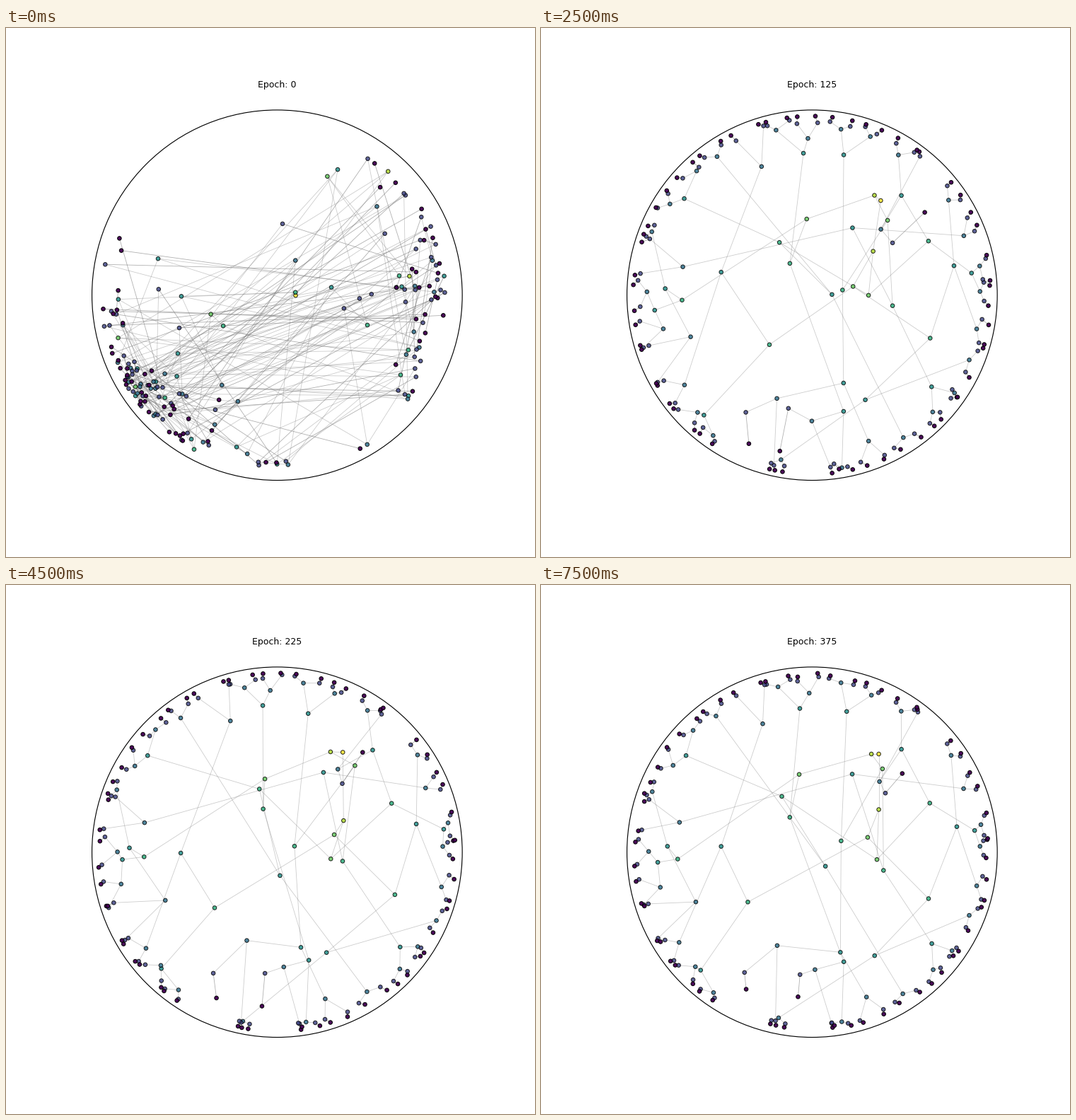
Recreate the animation shown at these times as a matplotlib script. Size 748x748 px, loop 8 s.

```python
import numpy as np
import matplotlib.pyplot as plt
from matplotlib.animation import FuncAnimation
from matplotlib.collections import LineCollection

FRAMES, STEP, INTERVAL = 16, 25, 500
RIM = 0.967
PINNED, INNER, HUB_END, BRANCH, TOTAL = 7, 31, 63, 127, 191
rng = np.random.default_rng(4)

# Perfect binary tree in heap order; every twig at the end carries one leaf.
ids = np.arange(TOTAL)
parent = np.where(ids < BRANCH, (ids - 1) // 2, ids - 64)
parent[0] = 0
height = np.where(ids < BRANCH, 7 - np.floor(np.log2(ids + 1)), 0)

# Where the top three levels settle, in disk coordinates.
CROWN = np.array([0.36 + 0.53j, 0.32 + 0.53j, 0.36 + 0.23j, -0.07 + 0.42j,
                  0.38 + 0.45j, 0.30 + 0.08j, 0.35 - 0.04j])


def polar(r, degrees):
    return r * np.exp(1j * np.radians(degrees))


def clip_disk(z, limit):
    return z * np.minimum(1, limit / np.maximum(np.abs(z), 1e-9))


def hub_angles():
    """Evenly spread hubs; half the sibling pairs are neighbours."""
    slots = np.arange(32).reshape(16, 2)
    slots[1::2] = rng.permutation(slots[1::2].ravel()).reshape(8, 2)
    rng.shuffle(slots)
    return slots.ravel() * 11.25 + rng.uniform(-2, 2, 32)


def settled_pose():
    z = np.zeros(BRANCH, complex)
    z[:PINNED] = CROWN
    angle = hub_angles()
    r = 0.93 - rng.exponential(0.05, 32)
    deep = np.arange(32) % 10 == 4
    r[deep] = rng.uniform(0.5, 0.65, deep.sum())
    z[INNER:HUB_END] = polar(r, angle)

    for _ in range(60):
        for i in range(PINNED, INNER):
            kids = z[2 * i + 1] + z[2 * i + 2]
            z[i] = 0.15 * z[parent[i]] + 0.425 * kids
    free = slice(PINNED, INNER)
    noise = rng.normal(size=(2, INNER - PINNED))
    z[free] += 0.13 * (1 - np.abs(z[free])) * (noise[0] + 1j * noise[1])

    spread = rng.uniform(1.2, 4.2, (32, 2)) + 12 * (0.93 - r)[:, None]
    twig_r = rng.uniform(0.925, 0.955, (32, 2))
    twig_r[deep, 1] = rng.uniform(0.45, 0.75, deep.sum())
    z[HUB_END:] = polar(twig_r, angle[:, None] + spread * [1, -1]).ravel()
    return z


def start_pose():
    """Untrained layout: two lobes, children often opposite their parent."""
    side = np.zeros(TOTAL, int)
    z = np.zeros(TOTAL, complex)
    for i in range(TOTAL):
        flip = rng.random() < (0.35 if i >= BRANCH else 0.55)
        side[i] = side[parent[i]] ^ (i > 0 and flip)
        if side[i]:
            angle = rng.normal(217, 12 if rng.random() < 0.6 else 32)
            r = 0.95 - rng.exponential(0.05 + 0.02 * height[i])
        else:
            angle = rng.normal(4, 28)
            r = 0.91 - rng.exponential(0.09 + 0.03 * height[i])
        if rng.random() < 0.05 + 0.04 * min(height[i], 4):
            r *= rng.uniform(0.3, 0.9)
            angle += rng.normal(0, 30)
        z[i] = polar(max(r, 0.1), angle)
    return z


start, settled = start_pose(), settled_pose()
modes = np.arange(1, 6)
sway = rng.normal(size=(BRANCH, 5)) + 1j * rng.normal(size=(BRANCH, 5))
sway *= (0.003 + 0.036 * (1 - np.abs(settled)))[:, None]
leaf_turn = polar(1, rng.uniform(-50, 50, 64))
leaf_reach = rng.uniform(0.8, 1.2, 64)


def trained(frame):
    """Tree wandering towards its settled pose while leaves close up."""
    left = (FRAMES - 1 - frame) / 12
    z = settled + sway @ np.sin(np.pi * modes * left)
    z = clip_disk(z, 0.958)
    twigs = z[-64:]
    r = np.abs(twigs)
    reach = (0.012 + 0.3 * (RIM - r)) * leaf_reach * (1 + 0.9 * left)
    leaves = twigs + twigs / r * leaf_turn * reach
    return np.r_[z, clip_disk(leaves, RIM)]


def pose(frame):
    mix = (0, 0.5, 0.88, 1)[min(frame, 3)]
    return start + (trained(max(frame, 3)) - start) * mix


fig, ax = plt.subplots(figsize=(10, 10), dpi=74.8)
ax.set_aspect("equal")
ax.set(xlim=(-1.1, 1.1), ylim=(-1.1, 1.1))
ax.axis("off")
ax.add_patch(plt.Circle((0, 0), 1, fill=False, color="black", lw=1.1))
title = ax.set_title("Epoch: 0")

is_leaf = ids >= BRANCH
edge_rgba = np.full((TOTAL - 1, 4), 0.5)
edge_rgba[:, 3] = np.where(is_leaf[1:], 0.62, 0.4)
edges = LineCollection([], colors=edge_rgba, linewidths=0.8, zorder=1)
ax.add_collection(edges, autolim=False)
dots = ax.scatter(np.zeros(TOTAL), np.zeros(TOTAL), s=28,
                  c=(height / 7) ** 0.8, cmap="viridis", vmin=0, vmax=1,
                  edgecolors="black", linewidths=1,
                  alpha=np.where(is_leaf, 0.96, 0.82), zorder=2)


def update(frame):
    z = pose(frame)
    xy = np.column_stack([z.real, z.imag])
    dots.set_offsets(xy)
    edges.set_segments(np.stack([xy[1:], xy[parent[1:]]], axis=1))
    title.set_text(f"Epoch: {frame * STEP}")
    return dots, edges, title


anim = FuncAnimation(fig, update, frames=FRAMES, interval=INTERVAL,
                     repeat=True, repeat_delay=0)
plt.show()
```
